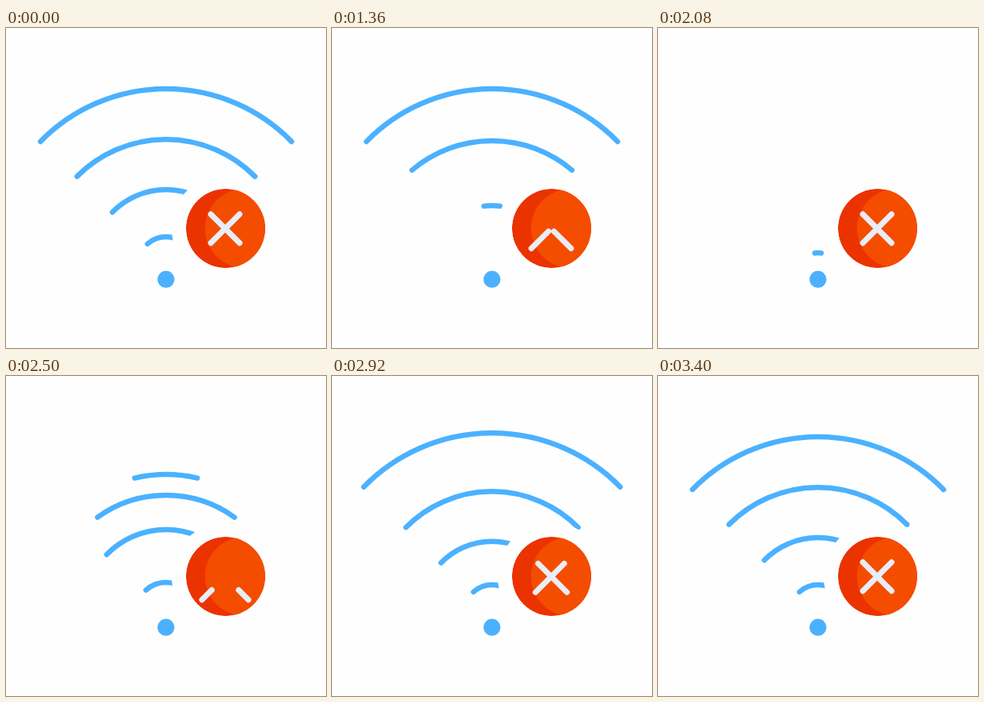
These frames come from a looping animation (400x400 px, 3430 ms). An HTML page:

```html
<!DOCTYPE html>
<html lang="en">
<head>
<meta charset="utf-8">
<title>No connection</title>
<style>
  html, body { margin: 0; width: 100%; height: 100%; overflow: hidden; background: #fefefe; }
  svg { display: block; width: 100%; height: 100%; }
  .line { fill: none; stroke-linecap: round; }
  #arcs { stroke: #4bb1ff; stroke-width: 6.5; }
  #cross { stroke: #e9edf5; stroke-width: 7; }
</style>
</head>
<body>
<svg viewBox="0 0 400 400">
  <defs>
    <clipPath id="badge"><circle cx="274.5" cy="250.5" r="49.5"/></clipPath>
  </defs>
  <g id="arcs" class="line"><path/><path/><path/><path/></g>
  <circle cx="200" cy="314.2" r="10.6" fill="#4bb1ff"/>
  <circle cx="274.5" cy="250.5" r="67.5" fill="#fefefe"/>
  <g clip-path="url(#badge)">
    <circle cx="274.5" cy="250.5" r="49.5" fill="#eb3300"/>
    <circle cx="298.3" cy="250.5" r="49.5" fill="#f44d00"/>
    <g id="cross" class="line"><path/><path/></g>
  </g>
</svg>
<script>
const LOOP = 3430, CX = 200, CY = 295.7;

// Rest radius, radius at birth, half angle, collapse start, entry delay
const arcs = [
  { r: 219.7, from: 155.7, angle: 45.6, out: 1490, delay: 360 },
  { r: 156.5, from: 93.7, angle: 45.3, out: 1337, delay: 240 },
  { r: 93.7, from: 34.7, angle: 45.7, out: 1183, delay: 90 },
  { r: 34.7, from: 0, angle: 41.8, out: 1030, delay: -80 }
];
const arcPaths = document.querySelectorAll('#arcs path');
const crossPaths = document.querySelectorAll('#cross path');

const linear = u => u;
const easeIn = u => u * u;
const easeOut = u => u * (2 - u);
const smooth = u => (1 - Math.cos(Math.PI * u)) / 2;
const clamp = u => Math.min(1, Math.max(0, u));

// Keys are [time, value, easing into this key]
function track(keys, t) {
  const i = keys.findIndex(k => t < k[0]);
  if (i === 0) return keys[0][1];
  if (i < 0) return keys[keys.length - 1][1];
  const [t0, a] = keys[i - 1], [t1, b, ease = linear] = keys[i];
  return a + (b - a) * ease((t - t0) / (t1 - t0));
}

function arcPose({ r, from, angle, out, delay }, t) {
  if (t < out) return [r, angle];
  const u = (t - out) / 215;
  if (u < 1) return [r - 25 * u ** 1.2, angle * (1 - u)];
  const s = t - delay;
  if (s < 2072) return null;
  const radius = track([
    [2100, from],
    [2440, r + 10.5, easeOut],
    [2750, r - 7.2, smooth],
    [2950, r, smooth]
  ], s);
  return [radius, angle * clamp((s - 2072) / 240)];
}

function arcPath(pose) {
  if (!pose) return '';
  const [r, deg] = pose, a = deg * Math.PI / 180;
  const x = r * Math.sin(a), y = CY - r * Math.cos(a);
  return `M${CX - x} ${y}A${r} ${r} 0 0 1 ${CX + x} ${y}`;
}

const tail = [
  [0, -18], [420, 16.5, easeIn], [475, 32], [495, -30], [570, -21, easeOut],
  [740, -15.5, smooth], [1000, -18, smooth]
];
const head = [
  [0, 18], [420, 29, easeIn], [475, 32], [495, -30], [570, 6],
  [740, 20.5, easeOut], [1000, 18, smooth]
];

function drawCross(t) {
  const s = t < 1030 ? 0 : t < 2080 ? t - 1030 : t - 2080;
  const a = track(tail, s), b = track(head, s);
  const shown = s < 475 || s > 495;
  [1, -1].forEach((dir, i) => {
    const point = d => `${274 + dir * d} ${250.7 + d}`;
    crossPaths[i].setAttribute('d', shown ? `M${point(a)}L${point(b)}` : '');
  });
}

function draw(now) {
  const t = now % LOOP;
  arcs.forEach((arc, i) => arcPaths[i].setAttribute('d', arcPath(arcPose(arc, t))));
  drawCross(t);
}

const start = performance.now();
function tick() {
  draw(performance.now() - start);
  requestAnimationFrame(tick);
}
tick();
</script>
</body>
</html>
```
